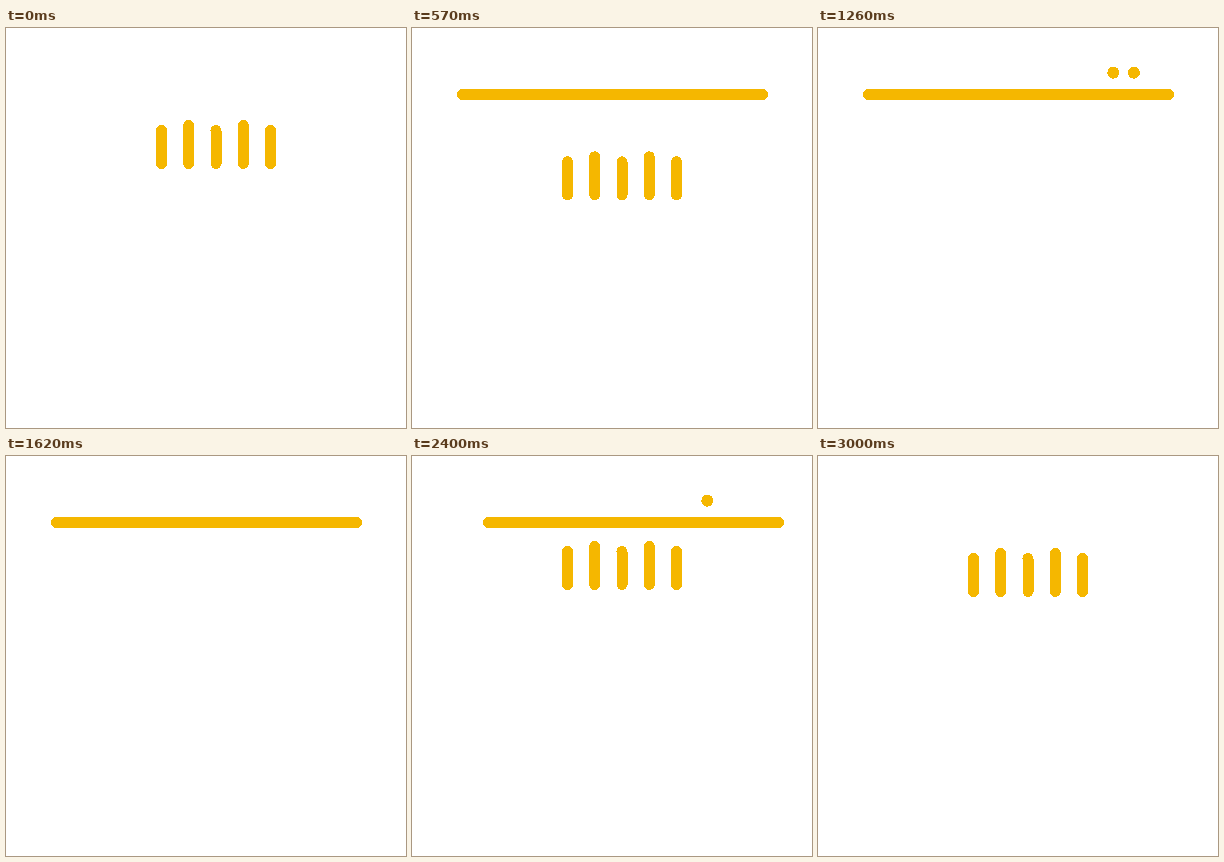
An HTML page for the animation above (4590 ms loop, 400 by 400 pixels).

```html
<!DOCTYPE html>
<html lang="en">
<head>
<meta charset="utf-8">
<title>Loop</title>
<style>
  html, body { margin: 0; width: 100%; height: 100%; overflow: hidden; background: #fff; }
  svg { display: block; width: 100%; height: 100%; }
</style>
</head>
<body>
<svg viewBox="0 0 400 400" fill="#f5b700" shape-rendering="crispEdges">
  <clipPath id="below"><rect y="66" width="400" height="334"/></clipPath>
  <g clip-path="url(#below)"><g id="bars"></g></g>
  <rect id="line" y="61" height="11" rx="5.5"/>
  <circle id="left" cx="295.3" cy="44.7" r="6"/>
  <circle id="right" cx="315.9" cy="44.7" r="6"/>
</svg>
<script>
const LOOP = 4590, STEP = 30;
const $ = id => document.getElementById(id);
const bars = $('bars'), line = $('line'), left = $('left'), right = $('right');

const clamp = u => Math.min(1, Math.max(0, u));
const span = (t, from, to) => clamp((t - from) / (to - from));
const mix = (a, b, u) => a + (b - a) * u;
const smooth = u => (1 - Math.cos(Math.PI * u)) / 2;
const show = (el, on) => el.setAttribute('visibility', on ? 'visible' : 'hidden');

for (let i = 0; i < 5; i++) {
  const bar = document.createElementNS('http://www.w3.org/2000/svg', 'rect');
  const height = i % 2 ? 49 : 44;
  const attrs = { x: 150 + 27.25 * i, y: 141 - height, width: 11, height, rx: 5.5 };
  for (const key in attrs) bar.setAttribute(key, attrs[key]);
  bars.append(bar);
}

// Offset of the bars from rest: dip, shoot up behind the line, drop back, settle.
function barOffset(t) {
  if (t < 325) return mix(0, 55, smooth(t / 325));
  if (t < 1500) return 55 - 16 * ((t - 325) / 215) ** 3;
  if (t < 2610) return 25 - 32 * ((2610 - t) / 210) ** 3;
  return mix(25, 0, smooth(span(t, 2610, 3000)));
}

// Both ends travel on their own curve, in from the left and out to the right.
function lineEnds(t) {
  if (t < 1500) {
    const rest = 1 - span(t, 0, 475);
    return [mix(45, -69, rest ** 2), mix(356, -6, rest ** 3)];
  }
  const u = span(t, 2200, 2680);
  return [mix(45, 406, u ** 3), mix(356, 448, u ** 2)];
}

function render(t) {
  bars.setAttribute('transform', `translate(0 ${barOffset(t)})`);
  const [a, b] = lineEnds(t);
  line.setAttribute('x', a);
  line.setAttribute('width', b - a);

  const blinkOff = t >= 1440 && t < 1890 && Math.floor((t - 1440) / 90) % 2 === 0;
  show(right, t >= 960 && t < 2250 && !blinkOff);
  show(left, t >= 1260 && t < 2460 && !blinkOff);
}

const start = performance.now();
function tick() {
  const t = (performance.now() - start) % LOOP;
  render(Math.floor(t / STEP) * STEP);
  requestAnimationFrame(tick);
}
tick();
</script>
</body>
</html>
```
